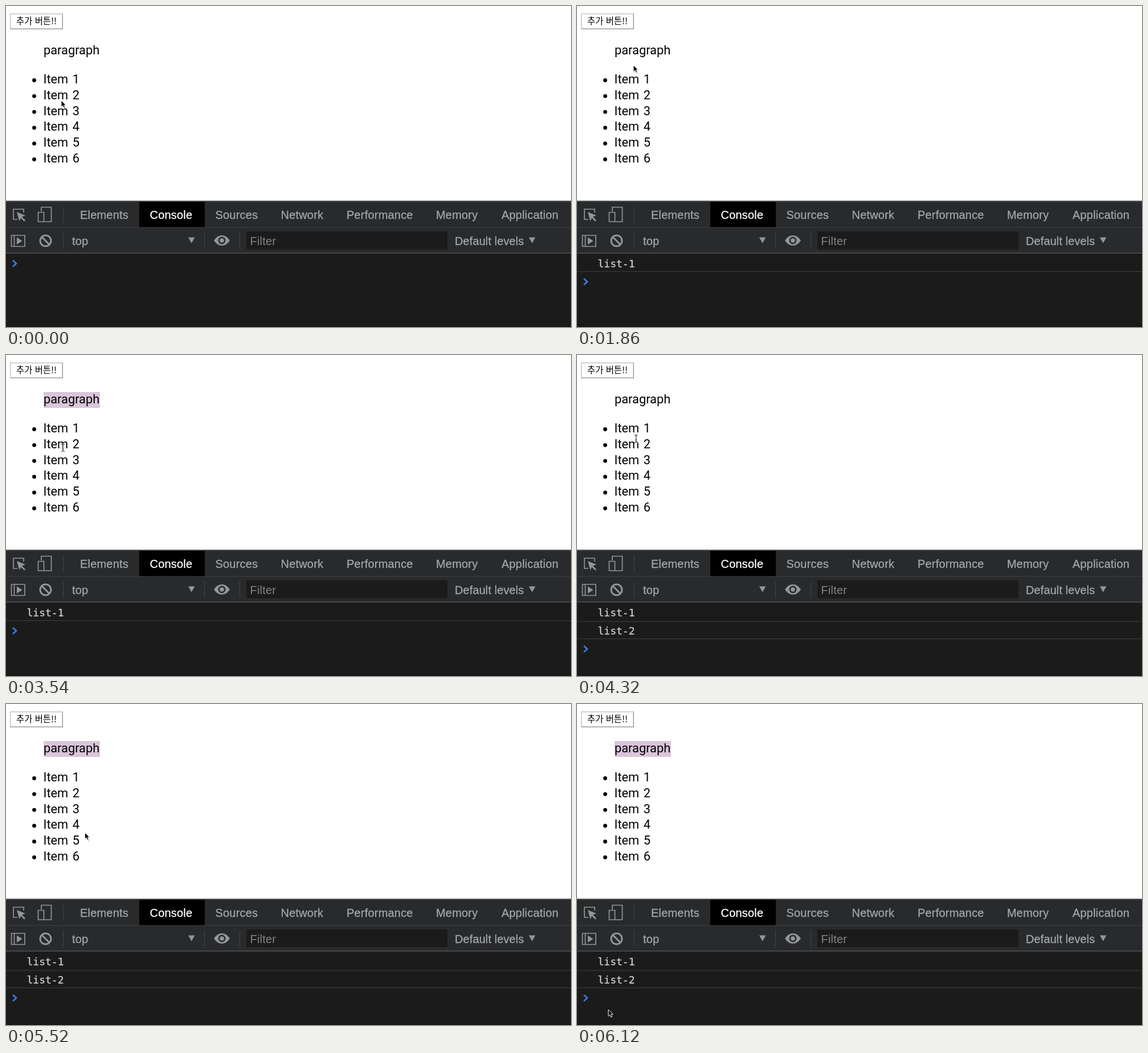
Recreate the animation shown at these times as an HTML page. Size 992 px wide and 564 px high, loop 6180 ms.

```html
<!DOCTYPE html>
<html lang="ko">
<head>
<meta charset="utf-8">
<title>Console list</title>
<style>
html, body { margin: 0; width: 100%; height: 100%; overflow: hidden; background: #fff; }
svg { display: block; width: 100%; height: 100%; }
.page { font: 21.8px Roboto, sans-serif; word-spacing: 2px; }
.btn { font: 15.4px "Noto Sans CJK KR", "Noto Sans CJK", sans-serif; }
.ui { font: 20px "Liberation Sans", sans-serif; letter-spacing: .2px; fill: #a3a6a9; stroke: #a3a6a9; stroke-width: .3; }
.ui .on { fill: #fff; stroke: #fff; }
.ui.dim { fill: #828487; stroke: none; }
.log { font: 18px "DejaVu Sans Mono", monospace; fill: #d2d2d2; }
.log text { stroke: #d2d2d2; stroke-width: .25; }
.line { fill: none; stroke: #939598; stroke-width: 1.7; }
.fill { fill: #939598; }
</style>
</head>
<body>
<svg viewBox="0 0 992 564" xmlns="http://www.w3.org/2000/svg">
  <rect width="992" height="564" fill="#fff"/>

  <rect x="7" y="13" width="93" height="28" fill="#9c9c9c"/>
  <path d="M7 13H100L98 15H9V39L7 41Z" fill="#c4c4c4"/>
  <rect x="8.5" y="14.5" width="90" height="25" fill="#fff"/>
  <text class="btn" x="18" y="31.5">추가 버튼!!</text>

  <rect id="mark" x="66" y="65" width="99" height="28" fill="#dac5da"/>
  <text class="page" x="66" y="84.5">paragraph</text>
  <g id="items" class="page"></g>

  <rect y="342" width="992" height="93" fill="#292a2b"/>
  <rect y="342" width="992" height="2" fill="#505154"/>
  <rect y="435" width="992" height="129" fill="#1b1b1b"/>
  <rect y="562" width="992" height="2" fill="#1b1418"/>
  <rect y="388.5" width="992" height="1" fill="#404143"/>
  <rect y="433.5" width="992" height="1.2" fill="#5a5b5c"/>
  <rect id="tabHover" x="111" y="345" width="123" height="43" fill="#0c0c0c"/>
  <rect x="234" y="344" width="115" height="44.500" fill="#000"/>
  <g id="tabs" class="ui"></g>
  <path d="M100.5 353V381M100.5 398V426M348.5 398V426M410.5 398V426" fill="none" stroke="#434446"/>

  <path class="line" d="M20 375H13V357H31V363"/>
  <path class="fill" d="M19 362L34 368L28 370.500L34 376.500L32 378.500L26 372.500L23.500 378Z"/>
  <path class="line" d="M62 361V353.500H79.500V379H66.500M56.500 362.500H66.500V379H56.500Z"/>

  <rect id="clearHover" x="49" y="393" width="40" height="37.500" fill="#424244"/>
  <path class="line" d="M9.500 403H33V422.500H9.500ZM14.500 403V422.500"/>
  <path class="fill" d="M19 406.500L28.500 412.700L19 419Z"/>
  <g class="line" style="stroke-width:3"><circle cx="69.500" cy="412.500" r="9.500"/><path d="M63 406L76 419"/></g>
  <text class="ui" x="116" y="419.500">top</text>
  <path class="fill" d="M320 406.500H331.500L325.700 416.800ZM918 406.500H929.500L923.700 416.800Z"/>
  <path class="fill" d="M365 412Q371 403 379 403T393 412Q387 421 379 421T365 412Z"/>
  <circle cx="379" cy="412" r="6.500" fill="#292a2b"/>
  <circle class="fill" cx="379" cy="412" r="3.800"/>
  <rect x="422" y="396" width="353" height="31.500" fill="#1b1b1b"/>
  <text class="ui dim" x="428.500" y="420">Filter</text>
  <text class="ui" x="788" y="419.500" style="letter-spacing:.1px">Default levels</text>

  <g id="log1" class="log">
    <text x="36.500" y="458.500">list-1</text>
    <rect id="rule1" y="466" width="992" height="1.200" fill="#3b3b3b"/>
  </g>
  <g id="log2" class="log">
    <text x="36.500" y="490.500">list-2</text>
    <rect y="498" width="992" height="1.200" fill="#3b3b3b"/>
  </g>
  <path id="prompt" d="M12 447L18 452.500L12 458" fill="none" stroke="#3a7de0" stroke-width="2.700"/>

  <g id="arrow">
    <path d="M1 2V14L4 11.500L6 16L8.500 15L6.500 10.500H10Z" fill="#000" opacity=".15"/>
    <path d="M0 0V11.500L2.700 9L4.600 13.300L6.700 12.400L4.900 8.200H8.300Z" fill="#000" stroke="#fff" stroke-width="1"/>
  </g>
  <g id="beam" fill="none">
    <path d="M-3 -6.500Q0 -6.500 0 -4Q0 -6.500 3 -6.500M0 -4V4M-3 6.500Q0 6.500 0 4Q0 6.500 3 6.500M-1.500 2H1.500" stroke="#fff" stroke-width="2.600" opacity=".7"/>
    <path d="M-3 -6.500Q0 -6.500 0 -4Q0 -6.500 3 -6.500M0 -4V4M-3 6.500Q0 6.500 0 4Q0 6.500 3 6.500M-1.500 2H1.500" stroke="#333" stroke-width="1.100"/>
  </g>
</svg>
<script>
const LOOP = 6180, STEP = 60;
const $ = id => document.getElementById(id);

$('items').innerHTML = [0, 1, 2, 3, 4, 5].map(i => {
  const y = 27.8 * i;
  return `<circle cx="49.5" cy="${130.5 + y}" r="3.4"/><text x="65.5" y="${136 + y}">Item ${i + 1}</text>`;
}).join('');

const tabs = { Elements: 130, Console: 252.5, Sources: 367.5, Network: 482.5,
  Performance: 598, Memory: 755, Application: 870 };
$('tabs').innerHTML = Object.entries(tabs).map(([name, x]) =>
  `<text id="${name}" x="${x}" y="373.5">${name}</text>`).join('');
$('Console').classList.add('on');

// Pointer path: time, x, y, shape worn until the next point
const path = [
  [0, 97, 166, 'arrow'], [240, 97, 146, 'beam'], [360, 96, 136, 'beam'],
  [780, 96, 136, 'beam'], [900, 93.5, 130.5, 'beam'], [1560, 93.5, 130.5, 'beam'],
  [1740, 96, 114, 'arrow'], [1860, 99, 104, 'arrow'], [1980, 114, 86, 'beam'],
  [2040, 121, 80, 'beam'], [2820, 121, 80, 'beam'], [2940, 116, 94, 'arrow'],
  [3120, 107, 117, 'beam'], [3480, 100, 162, 'beam'], [3540, 100, 163, 'beam'],
  [4260, 100, 163, 'beam'], [4440, 111, 115, 'arrow'], [4560, 129, 92, 'beam'],
  [4680, 140, 80, 'beam'], [5280, 140, 80, 'beam'], [5340, 140, 94, 'arrow'],
  [5580, 138, 270, 'arrow'], [5760, 126, 400, 'arrow'], [5940, 77, 500, 'arrow'],
  [6120, 55, 537, 'arrow'], [LOOP, 55, 537, 'arrow']
];

function pointer(t) {
  const i = path.findIndex(p => p[0] > t);
  const [t0, x0, y0, shape] = path[i - 1], [t1, x1, y1] = path[i];
  const k = (t - t0) / (t1 - t0);
  return { x: x0 + (x1 - x0) * k, y: y0 + (y1 - y0) * k, shape };
}

const show = (id, on) => $(id).setAttribute('visibility', on ? 'visible' : 'hidden');
const move = (id, x, y) => $(id).setAttribute('transform', `translate(${x} ${y})`);
const within = (t, a, b) => t >= a && t < b;

function draw(ms) {
  const t = Math.floor(ms % LOOP / STEP) * STEP;
  const first = t >= 1500, second = t >= 3780;
  const onTab = within(t, 5700, 5820);
  show('mark', within(t, 2400, 3660) || t >= 4920);
  show('clearHover', within(t, 540, 1500));
  show('tabHover', onTab);
  $('Elements').classList.toggle('on', onTab);
  show('log1', first);
  show('log2', second);
  $('rule1').setAttribute('y', second ? 467.5 : 466);
  move('prompt', 0, 32 * (first + second));

  const p = pointer(t);
  for (const id of ['arrow', 'beam']) {
    show(id, p.shape === id);
    move(id, p.x, p.y);
  }
}

const start = performance.now();
function tick() {
  draw(performance.now() - start);
  requestAnimationFrame(tick);
}
tick();
</script>
</body>
</html>
```
